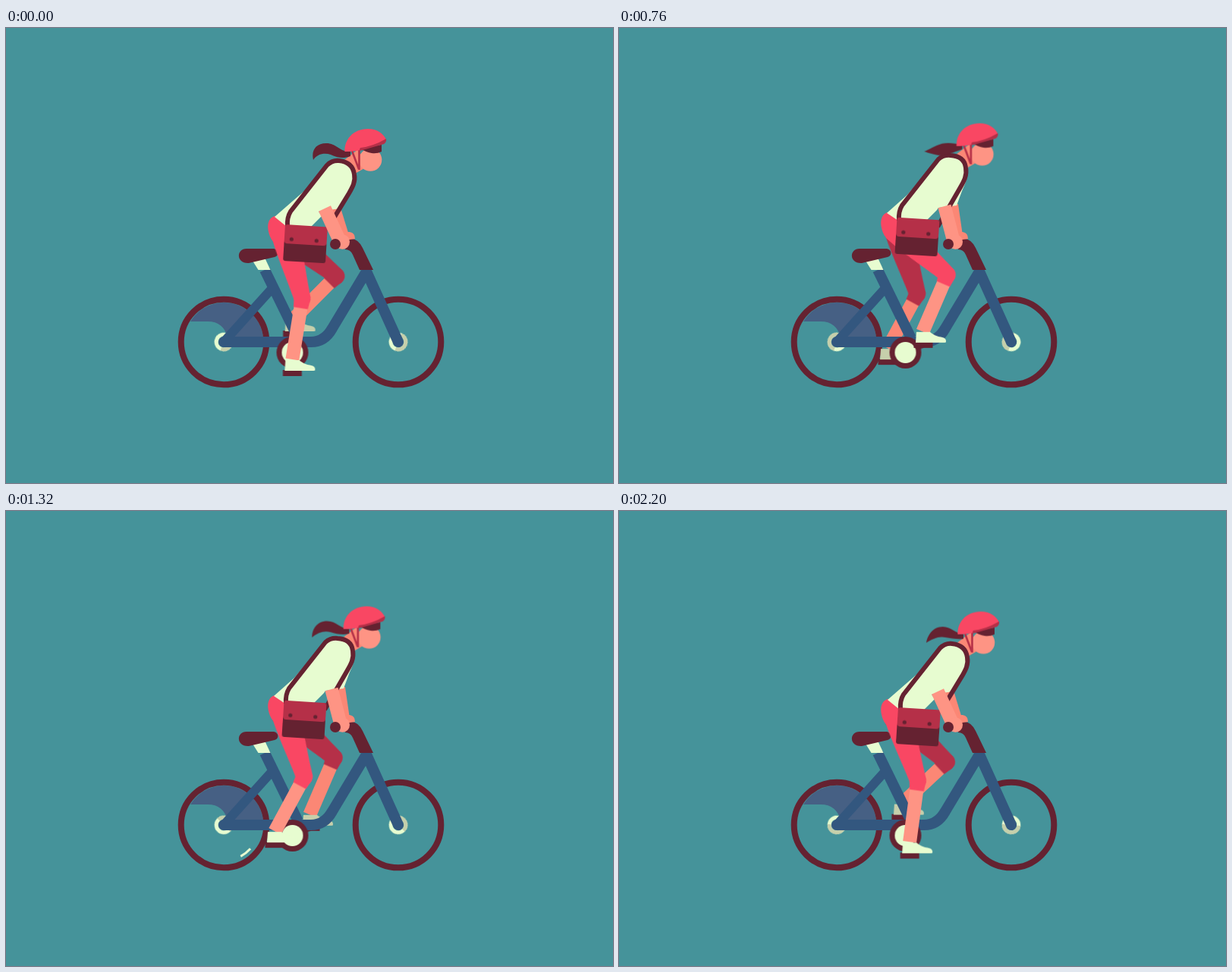
These frames come from a looping animation (800 px wide and 600 px high, 2240 ms). An HTML page without scripts:

```html
<!DOCTYPE html>
<html lang="en">
<head>
<meta charset="utf-8">
<title>Cyclist</title>
<style>
  html, body { margin: 0; width: 100%; height: 100%; overflow: hidden; background: #45939a; }
  svg { display: block; width: 800px; height: 600px; }

  :root {
    --maroon: #652231; --blue: #33577f; --cream: #e7fcd0; --tan: #c6cfab;
    --red: #f94763; --wine: #b53048; --skin: #fe9484; --blush: #fb8775;
  }
  .line { fill: none; }
  .maroon { fill: var(--maroon); }
  .cream { fill: var(--cream); }
  .skin { fill: var(--skin); }

  .near { --pants: var(--red); --flesh: var(--skin); --shoe: var(--cream); --lag: 0s; }
  .far { --pants: var(--wine); --flesh: var(--blush); --shoe: var(--tan); --lag: -.56s; }

  /* pedalling: one turn in 1.12 s */
  .crank, .orbit, .thigh, .knee { animation: crank 1.12s linear var(--lag) infinite; }
  .orbit { animation-name: orbit; }
  .thigh { animation-name: thigh; }
  .knee { animation-name: knee; }
  .hub { animation: crank 1.12s linear infinite; }
  @keyframes crank { from { transform: rotate(90deg); } to { transform: rotate(450deg); } }
  @keyframes orbit {
    from { transform: rotate(90deg) translateX(26px) rotate(-90deg); }
    to { transform: rotate(450deg) translateX(26px) rotate(-450deg); }
  }
  @keyframes thigh {
    0%, to { transform: rotate(-15deg); }
    7.14% { transform: rotate(-11.9deg); }
    14.29% { transform: rotate(-13.7deg); }
    21.43% { transform: rotate(-20deg); }
    28.57% { transform: rotate(-26.8deg); }
    35.71% { transform: rotate(-34.8deg); }
    42.86% { transform: rotate(-43.8deg); }
    50% { transform: rotate(-50.8deg); }
    57.14% { transform: rotate(-53.2deg); }
    64.29% { transform: rotate(-50.8deg); }
    71.43% { transform: rotate(-45.5deg); }
    78.57% { transform: rotate(-36.8deg); }
    85.71% { transform: rotate(-26.6deg); }
    92.86% { transform: rotate(-19.9deg); }
  }
  @keyframes knee {
    0%, to { transform: rotate(24.1deg); }
    7.14% { transform: rotate(25.9deg); }
    14.29% { transform: rotate(36.3deg); }
    21.43% { transform: rotate(53.9deg); }
    28.57% { transform: rotate(69.2deg); }
    35.71% { transform: rotate(82.3deg); }
    42.86% { transform: rotate(92.9deg); }
    50% { transform: rotate(95.8deg); }
    57.14% { transform: rotate(89.8deg); }
    64.29% { transform: rotate(78.1deg); }
    71.43% { transform: rotate(65deg); }
    78.57% { transform: rotate(49deg); }
    85.71% { transform: rotate(33deg); }
    92.86% { transform: rotate(26deg); }
  }
  .upper { d: path("M-18 -6C-19 18 -14 50 -11 87A11 11 0 0 0 11 87C13 52 18 25 18 -8Z"); fill: var(--pants); }
  .cuff { d: path("M-11 0L-9.5 13.5H9.5L11 0Z"); fill: var(--pants); }
  .shin { d: path("M0 8V82"); stroke: var(--flesh); stroke-width: 18; }
  .shoe { d: path("M-10 -3L-9 -17H9C15 -12 20 -11 25 -10Q30.5 -9 30 -4Q30 -3 28 -3Z"); fill: var(--shoe); }

  /* body: rises twice per turn */
  .hips, .shirt, .strap, .arm, .arm2, .head {
    animation: hips .56s cubic-bezier(.37, 0, .63, 1) infinite;
  }
  .shirt { animation-name: shirt; }
  .strap { animation-name: strap; }
  .arm { animation-name: arm; }
  .arm2 { animation-name: arm2; }
  .head { animation-name: head; }
  @keyframes hips {
    0%, 95%, to { transform: translateY(0); }
    30%, 62% { transform: translateY(-5px); }
  }
  @keyframes head {
    0%, to { transform: translate(0, 0); }
    50% { transform: translate(-2px, -9px); }
  }
  @keyframes shirt {
    0%, 95%, to { d: path("M354 249L393 215L424 179C432 173 456 174 460 192C463 205 456 214 451 222L440 238L412 242L416 248L402 262L370 262Z"); }
    30%, 62% { d: path("M353 244L380 220L421 172C429 166 454 166 458 184C461 196 456 206 452 215L445 234L421 237L419 240L405 254L368 254Z"); }
  }
  @keyframes strap {
    0%, 95%, to { d: path("M371 262Q370 250 375 242L423 181Q430 174 439 175Q457 177 459 193C461 203 456 211 452 218L424 264"); }
    30%, 62% { d: path("M369 254Q368 242 373 234L421 173Q428 167 437 168Q455 169 457 184C459 195 454 203 450 210L420 262"); }
  }
  @keyframes arm {
    0%, 95%, to { d: path("M420 238L440 281"); }
    30%, 62% { d: path("M429 235L441 281"); }
  }
  @keyframes arm2 {
    0%, 95%, to { d: path("M433 235L445 274"); }
    30%, 62% { d: path("M440 233L446 274"); }
  }
  .bag { animation: bag .56s ease-in-out infinite; }
  @keyframes bag {
    0%, to { transform: translate(368px, 259px) rotate(3.5deg); }
    21.5% { transform: translate(365px, 249px) rotate(6deg); }
    43% { transform: translate(367px, 250px) rotate(3deg); }
    64% { transform: translate(366px, 248px) rotate(5deg); }
    93% { transform: translate(368px, 259px) rotate(3.7deg); }
  }

  /* five hair waves in 2.24 s */
  .hair { animation: hair .448s linear infinite; }
  @keyframes hair {
    0%, to { d: path("M454 163C440 164 436 152 422 152C408 152 402 162 405 174C410 166 420 164 428 167C438 172 446 172 454 169Z"); }
    30% { d: path("M454 161C444 163 438 167 430 166C422 165 416 157 403 164C412 165 412 178 427 179C438 179 444 170 454 168Z"); }
    41% { d: path("M454 160C444 160 436 163 428 165C420 167 412 166 403 164C409 170 412 177 424 179C436 179 440 168 454 165Z"); }
    53% { d: path("M454 159C444 158 436 162 428 165C420 170 412 171 403 167C407 176 412 181 418 182C432 182 438 172 454 166Z"); }
    91% { d: path("M454 163C444 162 438 153 427 153C414 153 407 164 405 174C414 169 422 165 430 167C438 168 446 170 454 169Z"); }
  }

  /* glints sweeping inside the wheels */
  .glint { fill: none; stroke: var(--cream); stroke-width: 3; animation: rear 1.12s linear infinite; }
  .front { animation-name: front; }
  @keyframes rear {
    0%, 13% { stroke-dasharray: 0 720; stroke-dashoffset: -30; }
    21.43% { stroke-dasharray: 34 720; stroke-dashoffset: -50; }
    32.14% { stroke-dasharray: 52 720; stroke-dashoffset: -105; }
    46%, to { stroke-dasharray: 0 720; stroke-dashoffset: -225; }
  }
  @keyframes front {
    0%, 18% { stroke-dasharray: 0 720; stroke-dashoffset: -28; }
    21.43% { stroke-dasharray: 21 720; stroke-dashoffset: -32; }
    32.14% { stroke-dasharray: 90 720; stroke-dashoffset: -81.5; }
    46%, to { stroke-dasharray: 0 720; stroke-dashoffset: -270; }
  }
</style>
</head>
<body>
<svg viewBox="0 0 800 600">
  <defs>
    <g id="wheel">
      <circle class="line" r="56.3" stroke="var(--maroon)" stroke-width="8"/>
      <g class="hub line" stroke-width="5">
        <circle r="9.8" stroke="var(--cream)"/>
        <path d="M-9.8 0A9.8 9.8 0 0 1 9.8 0" stroke="var(--tan)"/>
      </g>
    </g>
  </defs>

  <!-- wheels -->
  <path fill="#466084" d="M243 387A52 52 0 0 1 339 407H292C288 394 280 387 266 387Z"/>
  <use href="#wheel" x="287" y="414"/>
  <use href="#wheel" x="517" y="414"/>
  <circle class="glint" cx="287" cy="414" r="47" pathLength="360"/>
  <circle class="glint front" cx="517" cy="414" r="47" pathLength="360" transform="rotate(-90 517 414)"/>

  <!-- far leg -->
  <g class="far">
    <g transform="translate(377.5 429)">
      <path class="crank line" d="M0 0H26" stroke="var(--maroon)" stroke-width="7"/>
      <rect class="orbit maroon" x="-12.5" y="-4" width="25" height="8"/>
    </g>
    <g class="hips"><g transform="translate(368 272)"><g class="thigh">
      <g transform="translate(0 87)"><g class="knee">
        <path class="shin"/>
        <path class="cuff"/>
      </g></g>
      <path class="upper"/>
    </g></g></g>
    <g transform="translate(377.5 429)"><path class="orbit shoe"/></g>
  </g>

  <!-- frame -->
  <g class="line" stroke="var(--blue)" stroke-width="14" stroke-linecap="round" stroke-linejoin="bevel">
    <path d="M287 414L351 343" stroke-width="12"/>
    <path d="M287 414H402Q420 414 430 396L475 321L517 414"/>
    <path d="M341 319L385 409" stroke-linecap="butt"/>
  </g>
  <path class="cream" d="M325 307L341 303L348.5 319H332.5Z"/>
  <path class="maroon" d="M317 291H352C359 291 361 300 354 302L320 310C303 311 303 291 317 291Z"/>
  <path class="maroon" d="M444 278H455Q464 278 470 290L484 319H466L457 299Q454 292 447 292Z"/>

  <!-- far arm -->
  <path class="arm2 line" stroke="var(--blush)" stroke-width="14"/>
  <path fill="var(--blush)" d="M442 269H453Q460 270 460 278L446 280Z"/>

  <!-- near leg -->
  <g class="near">
    <g transform="translate(377.5 429)">
      <path class="crank line" d="M0 0H26" stroke="var(--maroon)" stroke-width="7"/>
      <circle class="maroon" cy="-1" r="21"/>
      <circle class="cream" cy="-1" r="14"/>
      <rect class="orbit maroon" x="-12.5" y="-4" width="25" height="8"/>
    </g>
    <g class="hips">
      <g transform="translate(368 272)"><g class="thigh">
        <g transform="translate(0 87)"><g class="knee">
          <path class="shin"/>
          <path class="cuff"/>
        </g></g>
        <path class="upper"/>
      </g></g>
      <path fill="var(--red)" d="M354 248C343 252 344 265 348 275C352 285 362 290 374 292L392 285V256Z"/>
    </g>
    <g transform="translate(377.5 429)"><path class="orbit shoe"/></g>
  </g>

  <!-- torso -->
  <path class="head" fill="var(--blush)" d="M446 174L464 160L474 184L460 192Z"/>
  <path class="shirt cream"/>
  <path class="strap line" stroke="var(--maroon)" stroke-width="6"/>
  <g class="bag">
    <rect class="maroon" width="56" height="48" rx="3"/>
    <path fill="var(--wine)" d="M3 0H53Q56 0 56 3V21Q56 25 52 25H4Q0 25 0 21V3Q0 0 3 0Z"/>
    <circle class="maroon" cx="9.5" cy="19" r="2.6"/>
    <circle class="maroon" cx="42.5" cy="19" r="2.6"/>
  </g>

  <!-- head -->
  <g class="head">
    <path class="hair maroon"/>
    <circle class="skin" cx="480.3" cy="173.8" r="15"/>
    <path class="maroon" d="M467 159L495 154V163Q489 166 482 165Q475 164 467 159Z"/>
    <path class="line" d="M456 162L465 186M465.5 160V187" stroke="var(--wine)" stroke-width="2.6"/>
    <path fill="var(--red)" d="M446.500 163C445.500 148 457 133 477 133C489 133 497 139 501 147L499 152L470 160Q462 163 446.500 163Z"/>
    <path fill="var(--wine)" d="M501 146Q502 150 498 153L470 161Q464 163 467 158Q484 156 501 146Z"/>
  </g>

  <!-- near arm -->
  <path class="arm line" stroke="var(--skin)" stroke-width="17.5"/>
  <ellipse class="skin" cx="443.5" cy="282" rx="9.5" ry="9.8"/>
  <circle class="maroon" cx="434" cy="285" r="7"/>
</svg>
</body>
</html>
```
